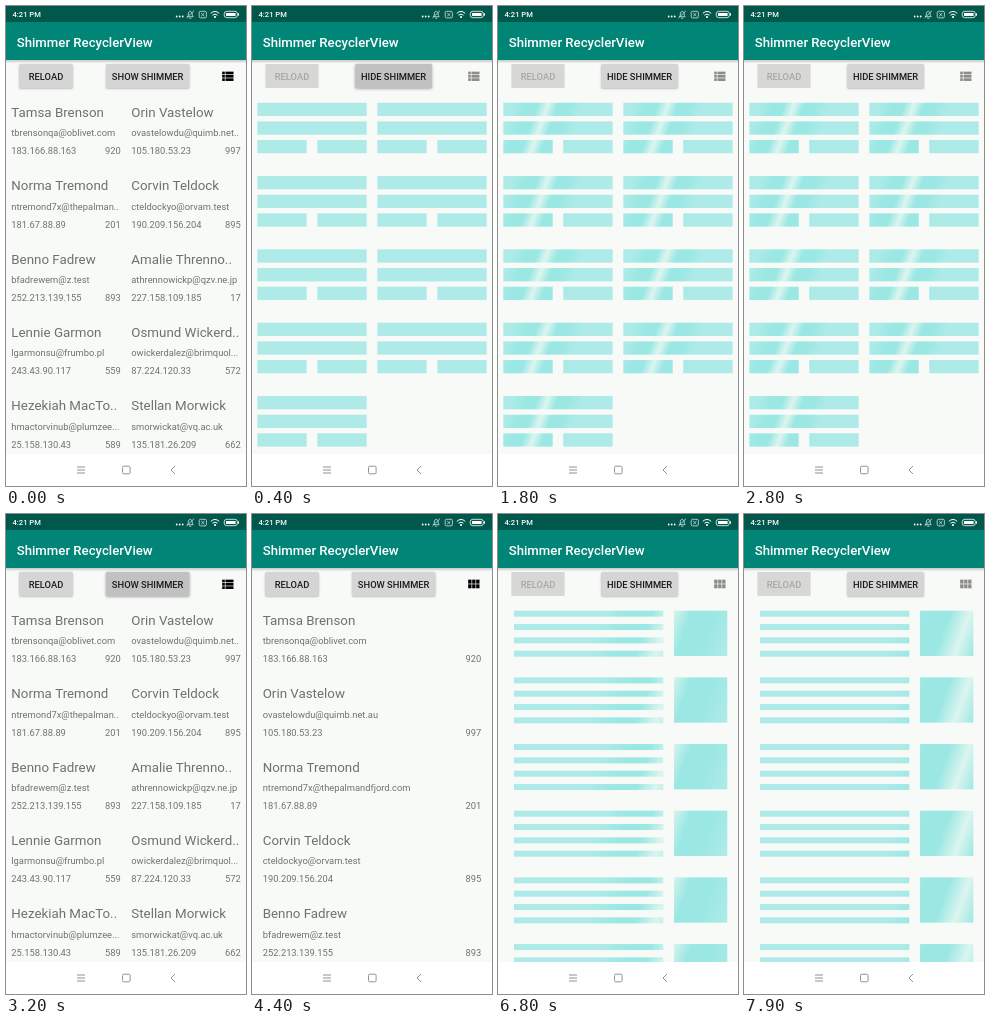
Animation of 240 by 480 pixels, one loop 8000 ms. Source, as an HTML page with a canvas:

```html
<!DOCTYPE html>
<html lang="en">
<head>
<meta charset="utf-8">
<title>Shimmer RecyclerView</title>
<style>
  html, body { margin: 0; width: 100%; height: 100%; overflow: hidden; background: #fafafa; }
  canvas { display: block; width: 100vw; height: 100vh; }
</style>
</head>
<body>
<canvas id="stage"></canvas>
<script>
const LOOP = 8000;
const ROW = 73.33;
const SKELETON = '#aeebe8';
const GLOW = '#9ae7e3';
const SHINE = '#dcf5ef';
const canvas = document.getElementById('stage');
const density = Math.max(1, window.devicePixelRatio || 1);
canvas.width = 240 * density;
canvas.height = 480 * density;
const ctx = canvas.getContext('2d');

const people = [
  ['Tamsa Brenson', 'tbrensonqa@oblivet.com', '183.166.88.163', 920],
  ['Orin Vastelow', 'ovastelowdu@quimb.net.au', '105.180.53.23', 997],
  ['Norma Tremond', 'ntremond7x@thepalmandfjord.com', '181.67.88.89', 201],
  ['Corvin Teldock', 'cteldockyo@orvam.test', '190.209.156.204', 895],
  ['Benno Fadrew', 'bfadrewem@z.test', '252.213.139.155', 893],
  ['Amalie Thrennowick', 'athrennowickp@qzv.ne.jp', '227.158.109.185', 17],
  ['Lennie Garmon', 'lgarmonsu@frumbo.pl', '243.43.90.117', 559],
  ['Osmund Wickerdale', 'owickerdalez@brimquol.org', '87.224.120.33', 572],
  ['Hezekiah MacTorvin', 'hmactorvinub@plumzee.com', '25.158.130.43', 589],
  ['Stellan Morwick', 'smorwickat@vq.ac.uk', '135.181.26.209', 662],
];

// Finger contacts: start, end, x, y
const touches = [
  [200, 300, 160, 73], [3000, 3100, 160, 73], [4100, 4200, 222, 70], [6100, 6200, 160, 73],
];

const clamp = v => Math.min(1, Math.max(0, v));

function rect(x, y, w, h, fill) {
  ctx.fillStyle = fill;
  ctx.fillRect(x, y, w, h);
}

function disc(x, y, r, fill) {
  ctx.fillStyle = fill;
  ctx.beginPath();
  ctx.arc(x, y, r, 0, 7);
  ctx.fill();
}

function stroke(path, color, width) {
  ctx.strokeStyle = color;
  ctx.lineWidth = width;
  ctx.stroke(new Path2D(path));
}

function strokeRound(x, y, w, h, radius, color, width) {
  ctx.strokeStyle = color;
  ctx.lineWidth = width;
  ctx.beginPath();
  ctx.roundRect(x, y, w, h, radius);
  ctx.stroke();
}

function text(str, x, y, size, color, { weight = 400, align = 'left', max = Infinity } = {}) {
  ctx.font = `${weight} ${size}px Roboto, sans-serif`;
  ctx.fillStyle = color;
  ctx.textAlign = align;
  let shown = String(str);
  for (let n = shown.length; ctx.measureText(shown).width > max; n--) shown = str.slice(0, n - 1) + '..';
  ctx.fillText(shown, x, y);
}

function drawPerson([name, email, ip, count], left, right, top) {
  const color = '#6f706f', max = right - left;
  text(name, left, top + 14.5, 13.33, color, { max });
  text(email, left, top + 33.8, 9.33, color, { max });
  text(ip, left, top + 51.7, 9.33, color);
  text(count, right, top + 51.7, 9.33, color, { align: 'right' });
}

function drawPeople(asList) {
  people.forEach((person, i) => {
    if (asList) drawPerson(person, 10.7, 229.3, 96.5 + i * ROW);
    else drawPerson(person, 5.3 + i % 2 * 120, 114.7 + i % 2 * 120, 96.5 + (i >> 1) * ROW);
  });
}

// Light band tilted by 20 degrees, centred on x, y
function shimmerFill(x, y, half) {
  const dx = half * Math.cos(Math.PI / 9), dy = half * Math.sin(Math.PI / 9);
  const fill = ctx.createLinearGradient(x - dx, y - dy, x + dx, y + dy);
  [[0, SKELETON], [.22, GLOW], [.36, GLOW], [.5, SHINE], [.64, GLOW], [.78, GLOW], [1, SKELETON]]
    .forEach(stop => fill.addColorStop(...stop));
  return fill;
}

function drawGridSkeleton(t) {
  const phase = ((t - 365 + LOOP) % 1000) / 1000;
  const sweep = t < 365 ? -143 : (2 * phase - 1) * 143;
  for (let i = 0; i < 9; i++) {
    const x = i % 2 * 120, y = 96.7 + (i >> 1) * ROW;
    const fill = shimmerFill(x + 60 + sweep, y + 25, 34);
    rect(x + 5.3, y, 109.4, 13.3, fill);
    rect(x + 5.3, y + 18.7, 109.4, 13.3, fill);
    rect(x + 5.3, y + 37.3, 49.4, 13.3, fill);
    rect(x + 65.3, y + 37.3, 49.4, 13.3, fill);
  }
}

function drawListSkeleton(t) {
  const phase = ((t - 6215 + LOOP) % 1000) / 1000;
  const sweep = t < 6215 ? -264 : (2 * phase - 1) * 264;
  for (let i = 0; i < 6; i++) {
    const y = 96.7 + i * 66.67;
    const fill = shimmerFill(120 + sweep, y + 23, 67);
    for (let line = 0; line < 4; line++) rect(16, y + line * 13.33, 149.3, 6, fill);
    rect(176, y, 53.3, 45.3, fill);
  }
}

function drawButton(label, x, w, enabled, press = 0) {
  ctx.save();
  if (enabled) {
    ctx.shadowColor = `rgba(0,0,0,${.28 + .1 * press})`;
    ctx.shadowBlur = (2 + press) * density;
    ctx.shadowOffsetY = .7 * density;
  }
  const shade = 213 - 20 * press;
  ctx.fillStyle = enabled ? `rgb(${shade},${shade},${shade})` : '#d7d8d6';
  ctx.beginPath();
  ctx.roundRect(x, 58, w, 24, 1.3);
  ctx.fill();
  ctx.restore();
  text(label, x + w / 2, 74, 9.33, enabled ? '#1c1c1c' : '#a7a8a6', { weight: 500, align: 'center' });
}

function drawLayoutIcon(asList, color) {
  const unit = 2 / 3;
  const cell = (x, y, w, h) => rect(213.5 + x * unit, 62.3 + y * unit, w * unit, h * unit, color);
  if (asList) {
    for (const x of [4, 10, 16]) for (const y of [5, 12]) cell(x, y, 5, 6);
  } else {
    for (const y of [5, 10, 15]) {
      cell(4, y, 4, 4);
      cell(9, y, 12, 4);
    }
  }
}

function drawStatusIcons() {
  const soft = '#d4e5e2';
  for (let i = 0; i < 3; i++) disc(170.7 + i * 3, 10.5, .9, '#fff');
  stroke('M181.3 10.7H187.2L186.2 9.2V7Q184.2 3.6 182.3 7V9.2ZM183.2 12.2H185.3M180.5 12L188 4.7', soft, .8);
  strokeRound(193.2, 5.3, 7.2, 6.6, 1.3, soft, .8);
  stroke('M195.2 7L198.4 10.2M198.4 7L195.2 10.2', soft, .8);
  stroke('M204.8 7.3Q209 3.6 213.2 7.3M206.5 9.2Q209 7 211.5 9.2', '#fff', 1);
  disc(209, 11, 1.1, '#fff');
  strokeRound(218.2, 5.3, 13.2, 6.4, 2.6, '#fff', .8);
  rect(220, 7, 9.6, 3, '#fff');
  rect(232, 7.3, 1, 2.4, '#fff');
}

function drawBars() {
  const shadow = ctx.createLinearGradient(0, 54, 0, 57.5);
  shadow.addColorStop(0, 'rgba(0,0,0,.2)');
  shadow.addColorStop(1, 'rgba(0,0,0,0)');
  rect(0, 54, 240, 3.5, shadow);
  rect(0, 0, 240, 16, '#00574b');
  rect(0, 16, 240, 38, '#008577');
  text('Shimmer RecyclerView', 10.7, 40.8, 13.2, '#fff', { weight: 500 });
  text('4:21 PM', 6.5, 11.3, 7.6, '#fff', { weight: 500 });
  drawStatusIcons();

  rect(0, 448, 240, 32, '#fff');
  stroke('M71 461H79M71 464H79M71 467H79M169 460L165 464L169 468', '#909090', 1);
  strokeRound(116.5, 460.2, 7.6, 7.6, 1.3, '#909090', 1);
}

function draw(t) {
  const asList = t >= 4200;
  const loading = (t >= 300 && t < 3100) || t >= 6200;
  ctx.setTransform(density, 0, 0, density, 0, 0);
  rect(0, 0, 240, 480, '#f8faf8');

  if (!loading) drawPeople(asList);
  else if (asList) drawListSkeleton(t);
  else drawGridSkeleton(t);

  // The button stays dark briefly after each tap
  const press = [200, 3000, 6200].reduce((p, s) =>
    t >= s ? Math.max(p, clamp((s + 500 - t) / 250)) : p, 0);
  drawButton('RELOAD', 13.3, 53.4, !loading);
  if (loading) drawButton('HIDE SHIMMER', 103.3, 76.5, true, press);
  else drawButton('SHOW SHIMMER', 100, 83.3, true, press);
  drawLayoutIcon(asList, loading ? '#8c8c8b' : '#000');
  drawBars();

  for (const [start, end, x, y] of touches) {
    if (t >= start && t < end) disc(x, y, 7, 'rgba(236,240,238,.75)');
  }
}

function tick() {
  draw(performance.now() % LOOP);
  requestAnimationFrame(tick);
}
tick();
</script>
</body>
</html>
```
